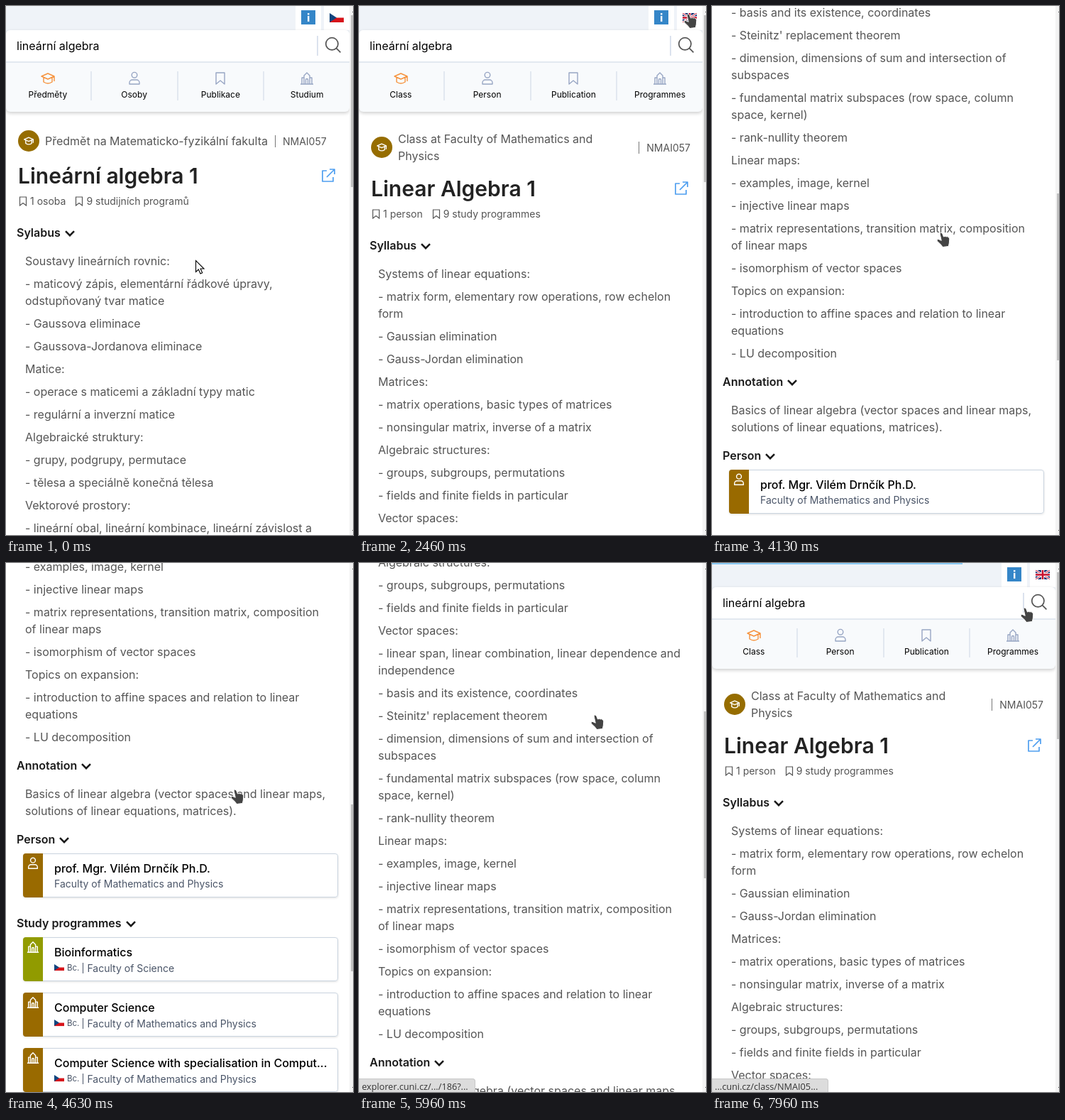
Animation, 489 px wide and 745 px high, one loop 8000 ms. Source, as an HTML page:

```html
<!DOCTYPE html>
<html lang="en">
<head>
<meta charset="utf-8">
<title>Course explorer</title>
<style>
  * { box-sizing: border-box; }
  html, body { margin: 0; width: 100%; height: 100%; overflow: hidden; background: #fff; }
  body { font: 16px/24px Inter, sans-serif; color: #555; }
  svg { display: block; flex: none; }
  #stage { position: relative; width: 489px; height: 745px; overflow: hidden; }
  .page { position: absolute; left: 0; top: 0; width: 484px; padding-top: 175px; }

  .top { position: absolute; left: 0; top: 0; width: 484px; height: 44px; background: #eff3f8; }
  .top div { position: absolute; top: 0; width: 36px; height: 34px; background: #fff; }
  .top svg { position: absolute; left: 8px; }
  .search { position: absolute; left: 0; top: 34px; width: 484px; height: 115px; background: #f8fafc;
            border-radius: 6px; box-shadow: 0 2px 5px rgba(0, 0, 0, .2); overflow: hidden; color: #000; }
  .query { height: 46px; padding: 10px 15px; background: #fff; border-bottom: 2px solid #e2e8f0; }
  .query i { position: absolute; left: 438px; top: 8px; width: 2px; height: 28px; background: #dbe2ee; }
  .query svg { position: absolute; left: 449px; top: 9px; }
  .tabs { display: flex; margin-left: -2px; }
  .tabs div { position: relative; flex: none; width: 121.75px; padding-top: 12px; text-align: center; font-size: 12px; line-height: 16px; }
  .tabs svg { margin: 0 auto 5px; }
  .tabs div + div::before { content: ""; position: absolute; left: -1px; top: 12px; width: 2px; height: 41px; background: #e2e8f0; }

  .subject { display: flex; align-items: center; width: 450px; min-height: 30px; margin-left: 17px; }
  .badge { flex: none; width: 30px; height: 30px; padding: 8px; margin-right: 8px; border-radius: 50%; background: #966d00; color: #fff; }
  .code { flex: none; margin-left: 10px; padding-left: 10px; border-left: 1px solid #777; font-size: 14px; line-height: 17px; }
  h1 { position: relative; margin: 16px 0 0 17px; font-size: 30px; line-height: 36px; font-weight: 600; color: #222; }
  h1 svg { position: absolute; left: 427px; top: 8px; }
  .meta { display: flex; align-items: center; margin: 8px 0 22px 18px; font-size: 14px; line-height: 20px; }
  .meta svg { margin-right: 4px; }
  .meta span { margin-right: 13px; }
  h3 { display: flex; align-items: center; gap: 6px; margin: 16px 0 16px 15px; font-size: 16px; line-height: 24px; font-weight: 600; color: #1a1a1a; }
  h3 svg { margin-top: 3px; }
  p { width: 430px; margin: 8px 0 8px 27px; }

  .cards { display: flex; flex-direction: column; gap: 16px; margin: -8px 0 0 24px; padding-bottom: 8px; }
  .card { position: relative; width: 444px; height: 62px; padding: 8px 0 0 43px; border: 1px solid #cbd5e0;
          border-radius: 4px; box-shadow: 0 1px 3px rgba(0, 0, 0, .12); }
  .card b { display: block; font-weight: 500; color: #000; white-space: nowrap; }
  .card div { display: flex; align-items: center; font-size: 14px; line-height: 20px; color: #4a5568; }
  .card small { margin: 0 5px 0 4px; font-size: 11.5px; }
  .card em { padding-left: 5px; font-style: normal; line-height: 15px; border-left: 1px solid #4a5568; }
  .strip { position: absolute; left: -1px; top: -1px; width: 28px; height: 62px; padding: 5px; color: #fff; border-radius: 4px 0 0 4px; }

  #track { position: absolute; left: 484px; top: 0; width: 5px; height: 745px; background: #f3f3f3; }
  #track::before, #track::after { content: ""; position: absolute; left: 4px; top: 8px; width: 1px; height: 1px; background: #555; }
  #track::after { top: 738px; }
  #thumb { position: absolute; left: 2px; width: 3px; background: #c1c1c1; }
  #progress { position: absolute; left: 0; top: 0; height: 2px; background: #8ccbf5; }
  #status { position: absolute; left: 0; top: 726px; width: 164px; height: 20px; padding: 0 4px; color: #333; background: #dcdcdc;
            border: solid #c8c8c8; border-width: 1px 1px 0 0; border-radius: 0 4px 0 0;
            font: 12.7px/20px "Open Sans", "Noto Sans", sans-serif; white-space: nowrap; }
  #cursor { position: absolute; left: 0; top: 0; overflow: visible; }
</style>
</head>
<body>
<div id="stage">
  <div id="view"></div>
  <div id="track"><div id="thumb"></div></div>
  <div id="progress"></div>
  <div id="status"></div>
  <svg id="cursor" width="24" height="24">
    <path id="arrow" d="M.5 .5V16.5L4.300 13L7 19L9.700 17.800L7.100 12H12Z" fill="#fff" stroke="#000" stroke-width="1.100"/>
    <path id="beam" d="M0 .5H2.500Q3.500 .5 3.500 2V18Q3.500 19.500 2.500 19.500H0M7 .5H4.500Q3.500 .5 3.500 2M3.500 18Q3.500 19.500 4.500 19.500H7" fill="none" stroke="#222"/>
    <path id="hand" d="M5 2.500Q6.500 0 8.500 2L10.500 7Q13 5.500 14 7Q16 6 16.800 7.500Q18.500 7.500 18.800 10L18.300 16L17.300 20.500L9 21.500L7 18.500L1.200 13Q.3 10.500 3 10.300L7.200 12.300Z" fill="#444" stroke="#fff"/>
  </svg>
</div>
<script>
const shapes = {
  cap: "M10 3L1 7l9 4 9-4zM4 9v6q6 4 12 0V9M19 7v7",
  person: "M10 9a3.800 3.800 0 1 0 0-7.600a3.800 3.800 0 0 0 0 7.600zM3 18v-2a4 4 0 0 1 4-4h6a4 4 0 0 1 4 4v2z",
  bookmark: "M4 2h12v16l-6-5-6 5z",
  building: "M1 18h18M3 18V9h3M17 18V9h-3M6 18V6l4-4 4 4v12M8.500 18v-6a1.500 1.500 0 0 1 3 0v6",
  search: "M9 1.500a7.500 7.500 0 1 0 0 15a7.500 7.500 0 0 0 0-15zM14.500 14.500l5 5",
  external: "M8 3H2v15h15v-6M12 1h7v7M19 1L8 12",
};
const icon = (name, size, color = "currentColor", weight = 1.6) =>
  `<svg width="${size}" height="${size}" viewBox="0 0 20 20" fill="none" stroke="${color}" stroke-width="${weight}" stroke-linejoin="round"><path d="${shapes[name]}"/></svg>`;
const mark = '<svg width="12" height="14" viewBox="0 0 12 14" fill="none" stroke="#555" stroke-width="1.200"><path d="M1.500 1h9v12L6 9.500 1.500 13z"/></svg>';
const chevron = '<svg width="14" height="9" fill="none" stroke="#1a1a1a" stroke-width="2.600"><path d="M1 1.200l6 6 6-6"/></svg>';
const flags = {
  cs: '<path fill="#fff" d="M0 0h20v7H0z"/><path fill="#d7141a" d="M0 6.500h20V13H0z"/><path fill="#11457e" d="M0 0l10 6.500L0 13z"/>',
  en: '<path fill="#012169" d="M0 0h20v13H0z"/><path stroke="#fff" stroke-width="2.800" d="M0 0l20 13M20 0L0 13"/><path stroke="#c8102e" d="M0 0l20 13M20 0L0 13"/><path stroke="#fff" stroke-width="4.500" d="M10 0v13M0 6.500h20"/><path stroke="#c8102e" stroke-width="2.600" d="M10 0v13M0 6.500h20"/>',
};
const flag = (lang, width, style = "") =>
  `<svg width="${width}" height="${width * .65}" viewBox="0 0 20 13" style="${style}">${flags[lang]}</svg>`;

const brown = "#996a00", olive = "#919b00";
const texts = {
  cs: {
    tabs: ["Předměty", "Osoby", "Publikace", "Studium"],
    subject: "Předmět na Matematicko-fyzikální fakulta", title: "Lineární algebra 1",
    meta: ["1 osoba", "9 studijních programů"], heading: "Sylabus",
    syllabus: `Soustavy lineárních rovnic:
- maticový zápis, elementární řádkové úpravy, odstupňovaný tvar matice
- Gaussova eliminace
- Gaussova-Jordanova eliminace
Matice:
- operace s maticemi a základní typy matic
- regulární a inverzní matice
Algebraické struktury:
- grupy, podgrupy, permutace
- tělesa a speciálně konečná tělesa
Vektorové prostory:
- lineární obal, lineární kombinace, lineární závislost a nezávislost`,
  },
  en: {
    tabs: ["Class", "Person", "Publication", "Programmes"],
    subject: "Class at Faculty of Mathematics and Physics", title: "Linear Algebra 1",
    meta: ["1 person", "9 study programmes"], heading: "Syllabus",
    syllabus: `Systems of linear equations:
- matrix form, elementary row operations, row echelon form
- Gaussian elimination
- Gauss-Jordan elimination
Matrices:
- matrix operations, basic types of matrices
- nonsingular matrix, inverse of a matrix
Algebraic structures:
- groups, subgroups, permutations
- fields and finite fields in particular
Vector spaces:
- linear span, linear combination, linear dependence and independence
- basis and its existence, coordinates
- Steinitz' replacement theorem
- dimension, dimensions of sum and intersection of subspaces
- fundamental matrix subspaces (row space, column space, kernel)
- rank-nullity theorem
Linear maps:
- examples, image, kernel
- injective linear maps
- matrix representations, transition matrix, composition of linear maps
- isomorphism of vector spaces
Topics on expansion:
- introduction to affine spaces and relation to linear equations
- LU decomposition`,
    annotation: "Basics of linear algebra (vector spaces and linear maps, solutions of linear equations, matrices).",
  },
};
const special = "Computer Science with specialisation in ";
const programmes = ["Bioinformatics", "Computer Science",
  ...["Comput", "General ", "Program", "Systems", "Web and"].map(s => special + s + "..."),
  "General Mathematics", "Mathematical Modelling"];

const heading = text => `<h3>${text}${chevron}</h3>`;
const card = (name, sub, shape, color) =>
  `<div class="card"><span class="strip" style="background:${color}">${icon(shape, 18)}</span><b>${name}</b><div>${sub}</div></div>`;
const programme = (name, i) => card(name,
  `${flag("cs", 14)}<small>Bc.</small><em>Faculty of ${i ? "Mathematics and Physics" : "Science"}</em>`, "building", i ? brown : olive);

function buildPage(lang) {
  const t = texts[lang], page = document.createElement("div");
  page.className = "page";
  const tabIcons = ["cap", "person", "bookmark", "building"];
  page.innerHTML = `
    <div class="top">
      <div style="left:408px"><svg width="20" height="20" style="top:6px"><path fill="#3586c8" d="M0 0h20v20H0z"/><path fill="#fff" d="M9 4h2.400v2.400H9zM9 8h2.400v8H9z"/></svg></div>
      <div style="left:448px">${flag(lang, 20, "top:10px")}</div>
    </div>
    <div class="search">
      <div class="query">lineární algebra<i></i>${icon("search", 23, "#555", 1.5)}</div>
      <div class="tabs">${t.tabs.map((s, i) => `<div>${icon(tabIcons[i], 20, i ? "#98a6c4" : "#f6923c", 1.4)}${s}</div>`).join("")}</div>
    </div>
    <div class="subject"><span class="badge">${icon("cap", 14, "#fff", 2)}</span><span>${t.subject}</span><span class="code">NMAI057</span></div>
    <h1>${t.title}${icon("external", 20, "#4f9ff0", 1.7)}</h1>
    <div class="meta">${t.meta.map(s => `${mark}<span>${s}</span>`).join("")}</div>
    ${heading(t.heading)}
    ${t.syllabus.split("\n").map(s => `<p>${s}</p>`).join("")}
    ${t.annotation ? `${heading("Annotation")}<p>${t.annotation}</p>
      ${heading("Person")}<div class="cards">${card("prof. Mgr. Vilém Drnčík Ph.D.", "Faculty of Mathematics and Physics", "person", brown)}</div>
      ${heading("Study programmes")}<div class="cards">${programmes.map(programme).join("")}</div>` : ""}`;
  return document.getElementById("view").appendChild(page);
}
const pages = { cs: buildPage("cs"), en: buildPage("en") };

// Each key is [time, ...values]; two keys at one time make a hard jump.
const scrollKeys = [[0, 0], [3960, 0], [3960, 685], [4040, 685], [4210, 900], [4630, 900], [4630, 1044], [4670, 1044],
  [4830, 1385], [4880, 1385], [4960, 1534], [5960, 1534], [5960, 626], [6080, 626], [6080, 220], [6210, 220], [6210, 0]];
const cursorKeys = [[0, 267, 358], [40, 267, 358], [830, 421, 59], [880, 421, 59], [1040, 455, 2], [1790, 455, 2],
  [1790, 457, 10], [3460, 457, 10], [3710, 316, 318], [5420, 316, 318], [5420, 71, 263], [5960, 71, 263],
  [5960, 326, 213], [6460, 326, 213], [7130, 467, 11], [7420, 467, 11], [7500, 461, 0], [7960, 461, 0], [7960, 434, 62]];
const progressKeys = [[0, 0], [1920, 0], [2400, 489], [2460, 489], [2460, 0], [7960, 0], [7960, 353]];

function at(keys, time, ease = u => u) {
  const i = keys.findLastIndex(k => k[0] <= time), a = keys[i], b = keys[i + 1] || a;
  const u = b === a ? 0 : ease((time - a[0]) / (b[0] - a[0]));
  return a.slice(1).map((v, j) => v + (b[j + 1] - v) * u);
}
const smooth = u => u * u * (3 - 2 * u);
const el = id => document.getElementById(id);
const show = (node, on) => { node.style.display = on ? "" : "none"; };

function draw(time) {
  const lang = time < 2200 ? "cs" : "en";
  const scroll = Math.round(at(scrollKeys, time)[0]);
  for (const key in pages) show(pages[key], key === lang);
  pages[lang].style.top = -scroll + "px";
  el("thumb").style.top = Math.round(13 + scroll * .3135) + "px";
  el("thumb").style.height = (lang === "cs" ? 242 : 235) + "px";
  el("progress").style.width = at(progressKeys, time)[0] + "px";

  show(el("status"), time >= 5960);
  el("status").textContent = time < 7080 ? "explorer.cuni.cz/.../186?..." : "...cuni.cz/class/NMAI05...";

  const [x, y] = at(cursorKeys, time, smooth).map(Math.round);
  const pointer = time < 780 ? "arrow" : time < 930 ? "beam" : "hand";
  for (const id of ["arrow", "beam", "hand"]) show(el(id), id === pointer);
  el("cursor").style.transform = `translate(${x}px, ${y}px)`;
}

const start = performance.now();
function tick() {
  draw((performance.now() - start) % 8000);
  requestAnimationFrame(tick);
}
tick();
</script>
</body>
</html>
```
